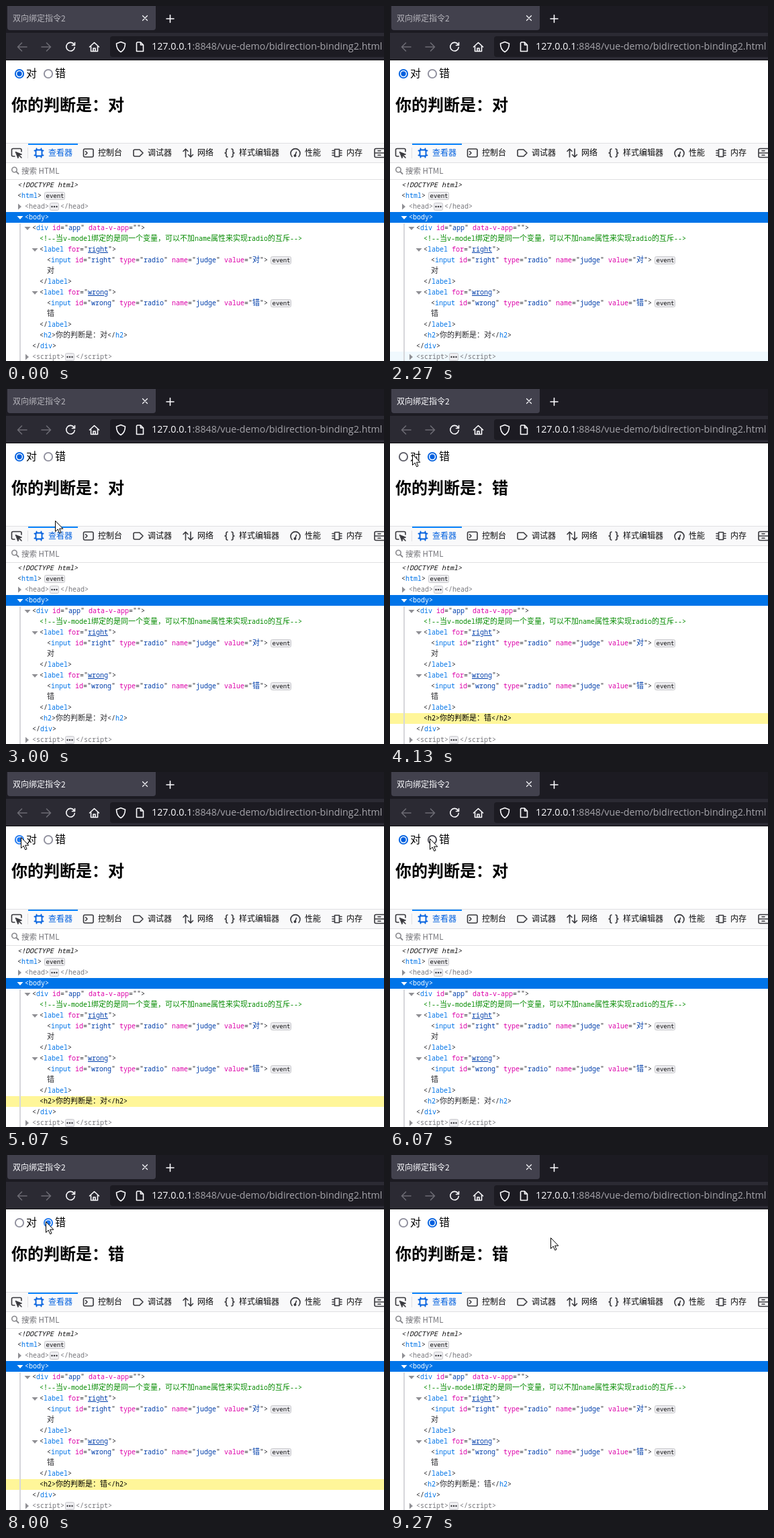
Write an HTML page that moves like this. It is 563 px wide and 529 px high and loops after 9340 ms.

```html
<!DOCTYPE html>
<html lang="zh">
<head>
<meta charset="utf-8">
<style>
html, body { margin: 0; width: 100%; height: 100%; overflow: hidden; background: #fff }
svg { display: block }
text { font-family: "Noto Sans CJK SC", "Noto Sans CJK", sans-serif; white-space: pre }
#url { font: 14.3px "Open Sans", "Noto Sans", sans-serif }
#tools text { font-size: 12px; font-weight: 500 }
#tree text { font: 10px "Noto Sans Mono", "Liberation Mono", monospace; fill: #2a2a2e }
#tree .badge { font-size: 9px; fill: #0c0c0d }
#tree .doctype { font-style: italic; fill: #0c0c0d }
#tree .cjk { font: 11px "Noto Sans CJK SC", "Noto Sans CJK", sans-serif }
.tag { fill: #0074e8 } .attr { fill: #dd00a9 } .val { fill: #003eaa } .note { fill: #058b00 }
.link { text-decoration: underline }
#tree .dim, .dim tspan { fill: #77777c }
#tree .sel, .sel tspan { fill: #fff }
#tree .flash, .flash tspan { fill: #000 }
.line { fill: none; stroke-width: 1.6; stroke-linecap: round; stroke-linejoin: round }
</style>
</head>
<body>
<svg width="563" height="529" viewBox="0 0 563 529">
  <!-- browser chrome -->
  <path fill="#1c1b22" d="M0 0H563V40H0z"/>
  <path fill="#2b2a33" d="M0 40H563V80H0z"/>
  <path fill="#0c0c0d" d="M0 80H563V81H0z"/>
  <rect x="2" y="-6" width="221" height="42" rx="4" fill="#42414d"/>
  <rect x="155" y="45" width="420" height="31" rx="4" fill="#1c1b22"/>
  <text id="title" x="10" y="23" font-size="12">双向绑定指令2</text>
  <g class="line" stroke="#fbfbfe" stroke-width="1.4">
    <path stroke-width="1.2" d="M203.5 14.5l7 7m0-7l-7 7"/>
    <path d="M239 19H250M244.500 13.500V24.500"/>
    <path stroke="#6c6b73" d="M31 61H17.500M23.500 55l-6 6 6 6M53 61H66.500M60.500 55l6 6-6 6"/>
    <path d="M101.500 57.500A6.300 6.300 0 1 0 102.300 61.500M102.500 54.500V58.500H98.500"/>
    <path d="M124.500 61L131.500 54.500 138.500 61M126.500 60V67.500H136.500V60M130 67V63H133V67"/>
    <path d="M171 53.500L177.500 56C177.500 62 175.500 66 171 68.500 166.500 66 164.500 62 164.500 56z"/>
    <path d="M195.500 54H200.500L204.500 58V67.500H194.500V55zM200.500 54V58H204.500"/>
  </g>
  <text id="url" x="217" y="65" fill="#a5a4aa"><tspan fill="#fbfbfe">127.0.0.1</tspan>:8848/vue-demo/bidirection-binding2.html</text>

  <!-- page -->
  <g id="radios"></g>
  <text x="30" y="106" font-size="16">对</text>
  <text x="73" y="106" font-size="16">错</text>
  <text id="answer" x="8" y="156" font-size="24" font-weight="bold"></text>

  <!-- inspector toolbar -->
  <path fill="#f9f9fa" d="M0 204H563V234H0z"/>
  <path fill="#e0e0e2" d="M0 204H563V205H0zM0 233H563V234H0zM0 258H563V259H0zM32 211H33V227H32z"/>
  <path fill="#0a84ff" d="M33 205H107V207H33z"/>
  <g id="tools">
    <g class="line" stroke="#38383d">
      <path d="M13 224H10.500Q8.500 224 8.500 222V214.500Q8.500 212.500 10.500 212.500H21Q23 212.500 23 214.500V217"/>
      <path fill="#38383d" stroke-width="1" d="M14.500 217.500L23.500 221 19.500 222.500 18 226.500z"/>
      <path d="M20.500 223.500L23 226"/>
      <path stroke="#0060df" stroke-width="1.9" d="M46 214.500H52Q53.500 214.500 53.500 216V222Q53.500 223.500 52 223.500H46Q44.500 223.500 44.500 222V216Q44.500 214.500 46 214.500M45.500 212.500V214M52.500 212.500V214M45.500 224V225.500M52.500 224V225.500M42.500 215.500H44M42.500 222.500H44M54 215.500H55.500M54 222.500H55.500"/>
      <path d="M117.500 213H128Q130 213 130 215V223Q130 225 128 225H117.500Q115.500 225 115.500 223V215Q115.500 213 117.500 213M118.500 216.500L121 219 118.500 221.500"/>
      <path d="M192 214H199L204 219 199 224H192Q190 224 190 222V216Q190 214 192 214"/>
      <path d="M267.500 225V213M264 216.500L267.500 213 271 216.500M275 213V225M271.500 221.500L275 225 278.500 221.500"/>
      <path d="M330 213Q328 213 328 215V217Q328 219 326 219 328 219 328 221V223Q328 225 330 225M336 213Q338 213 338 215V217Q338 219 340 219 338 219 338 221V223Q338 225 336 225"/>
      <path d="M426 224.500A7 7 0 1 1 436 224.500M430.500 223L432.500 217.500"/>
      <circle cx="430.500" cy="223" r="1.200"/>
      <path d="M489.500 213.500H496.500V224.500H489.500zM486 215.500H488M486 219H488M486 222.500H488M498 215.500H500M498 219H500M498 222.500H500"/>
      <path d="M551 212.500H563M551 225.500H563M551 212.500Q549 212.500 549 214.500V223.500Q549 225.500 551 225.500M549 219H563M554 215.800H558M554 222.200H558"/>
    </g>
  </g>
  <g class="line" stroke="#8a8a8e"><circle cx="12.500" cy="244" r="3.700"/><path stroke-width="2" d="M15.500 247L18.500 250"/></g>
  <text x="23" y="250" font-size="11.500" fill="#737378">搜索 HTML</text>

  <!-- markup tree -->
  <path fill="#0074e8" d="M0 307H563V323H0z"/>
  <rect id="hover" width="563" height="16" fill="#f0f9fe"/>
  <rect id="glow" y="483" width="563" height="16" fill="#fff699"/>
  <path fill="#d7d7db" d="M20 324H22V529H20z"/>
  <g id="tree"></g>

  <path id="cursor" fill="#fff" stroke="#000" d="M.5 .5V16.500L4.200 13 6.700 18.800 9 17.800 6.600 12.200H11.800z"/>
</svg>
<script>
const $ = id => document.getElementById(id);
const add = (id, html) => $(id).insertAdjacentHTML('beforeend', html);
const span = (cls, s) => `<tspan class="${cls}">${s}</tspan>`;
const rowY = i => 259 + 16 * i;

function colour(s) {
  return s.replace(/(<!--.*)|(<\/?)(\w+)|([\w-]+)="(.*?)"|</g, (m, note, open, tag, attr, val) =>
    note ? span('note', note.replace('<', '&lt;')) :
    tag ? open.replace('<', '&lt;') + span('tag', tag) :
    attr ? span('attr', attr) + '="' + span(attr == 'for' ? 'val link' : 'val', val) + '"' : '&lt;'
  ).replace(/[^\x00-\xff]+/g, c => span('cjk', c));
}
const code = (x, i, s, more = '') => add('tree', `<text x="${x}" y="${rowY(i) + 11}" ${more}>${colour(s)}</text>`);

function twisty(x, i, open, fill = '#8f8f94') {
  const y = rowY(i) + 8;
  add('tree', `<path fill="${fill}" d="${open ? `M${x - 4.5} ${y - 2}h9l-4.5 5z` : `M${x - 2} ${y - 4.5}v9l5-4.5z`}"/>`);
}
function badge(x, i, w, label) {
  const y = rowY(i) + 2.5;
  add('tree', `<rect x="${x}.5" y="${y}" width="${w}" height="11" rx="2" fill="#ededf0" stroke="#c8c8cc"/>` + (label
    ? `<text class="badge" x="${x + 2.5}" y="${y + 8.5}">${label}</text>`
    : [3, 6.5, 10].map(d => `<circle cx="${x + d + .5}" cy="${y + 5.5}" r="1.2" fill="#38383d"/>`).join('')));
}
function folded(x, i, tag) {
  const end = x + 6 * (tag.length + 2);
  twisty(x - 8, i, false);
  code(x, i, `<${tag}>`, 'class="dim"');
  badge(end + 1, i, 13);
  code(end + 17, i, `</${tag}>`, 'class="dim"');
}
function choice(i, id, word) {
  twisty(43, i, true);
  code(50, i, `<label for="${id}">`);
  code(61, i + 1, `<input id="${id}" type="radio" name="judge" value="${word}">`);
  badge(394, i + 1, 30, 'event');
  code(61, i + 2, word);
  code(50, i + 3, '</label>');
}

[['查看器', 63], ['控制台', 137], ['调试器', 211], ['网络', 285], ['样式编辑器', 347], ['性能', 445], ['内存', 507]]
  .forEach(([s, x], i) => add('tools', `<text x="${x}" y="223" fill="${i ? '#0c0c0d' : '#0060df'}">${s}</text>`));

code(17, 0, '<!DOCTYPE html>', 'class="doctype"');
code(17, 1, '<html>');
badge(57, 1, 30, 'event');
folded(28, 2, 'head');
twisty(21, 3, true, '#fff');
code(28, 3, '<body>', 'class="sel"');
twisty(32, 4, true);
code(39, 4, '<div id="app" data-v-app="">');
code(50, 5, '<!--当v-model绑定的是同一个变量，可以不加name属性来实现radio的互斥-->');
choice(6, 'right', '对');
choice(10, 'wrong', '错');
code(50, 14, '', 'id="heading"');
code(39, 15, '</div>');
folded(39, 16, 'script');

// All timing below is counted in steps of 1/15 s.
const path = [[36, 255, 529], [37, 240, 452], [39, 200, 347], [40, 190, 322], [41, 130, 250], [42, 82, 231],
  [44, 82, 231], [48, 44, 92], [50, 59, 99], [59, 59, 99], [62, 33, 97], [64, 24, 97], [67, 24, 97],
  [68, 22, 97], [83, 22, 97], [89, 59, 99], [96, 59, 99], [101, 26, 99], [107, 26, 99], [111, 59, 99],
  [125, 59, 99], [130, 174, 123], [135, 174, 123], [139, 239, 123]];
// [answer changes, flash starts to fade]
const clicks = [[53, 62], [76, 83], [92, 96], [102, 107], [115, 120]];

function tip(k) {
  const i = path.findIndex(p => p[0] >= k);
  if (i < 1) return path[i ? path.length - 1 : 0].slice(1);
  const [a, b] = [path[i - 1], path[i]], f = (k - a[0]) / (b[0] - a[0]);
  return [1, 2].map(n => Math.round(a[n] + (b[n] - a[n]) * f));
}
function radio(cx, on, over, down) {
  const c = on ? (over ? '#1f78f0' : '#0060df') : down ? '#484851' : over ? '#5b5b66' : '#8f8f9d';
  return `<circle cx="${cx}" cy="101" r="6.1" fill="#fff" stroke="${c}" stroke-width="1.9"/>` +
    (on ? `<circle cx="${cx}" cy="101" r="3.7" fill="${c}"/>` : '');
}

function draw(k) {
  const [x, y] = tip(k);
  const count = clicks.filter(c => k >= c[0]).length;
  const word = count % 2 ? '错' : '对';
  const down = clicks.some(c => k == c[0] - 1);
  const inLine = y > 91 && y < 111;
  const fade = count ? Math.min(1, Math.max(0, 1 - (k - clicks[count - 1][1]) / 2)) : 0;
  const row = Math.floor((tip(k - 1)[1] - 259) / 16);
  const hovered = k >= 34 && row >= 0 && row != 3;

  $('title').setAttribute('fill', k < 52 ? '#b5b4bb' : '#fbfbfe');
  $('radios').innerHTML = radio(20, word == '对', inLine && x > 11 && x < 47, down) +
    radio(63, word == '错', inLine && x > 54 && x < 90, down);
  $('answer').textContent = '你的判断是：' + word;
  $('heading').innerHTML = colour(`<h2>你的判断是：${word}</h2>`);
  $('heading').setAttribute('class', fade ? 'flash' : '');
  $('glow').setAttribute('opacity', fade);
  $('hover').setAttribute('y', rowY(row));
  $('hover').setAttribute('opacity', +hovered);
  $('cursor').setAttribute('transform', `translate(${x} ${y})`);
}

let last = -1;
function tick() {
  const k = Math.floor((performance.now() % 9340 + 4) * 15 / 1000);
  if (k != last) draw(last = k);
  requestAnimationFrame(tick);
}
tick();
</script>
</body>
</html>
```
